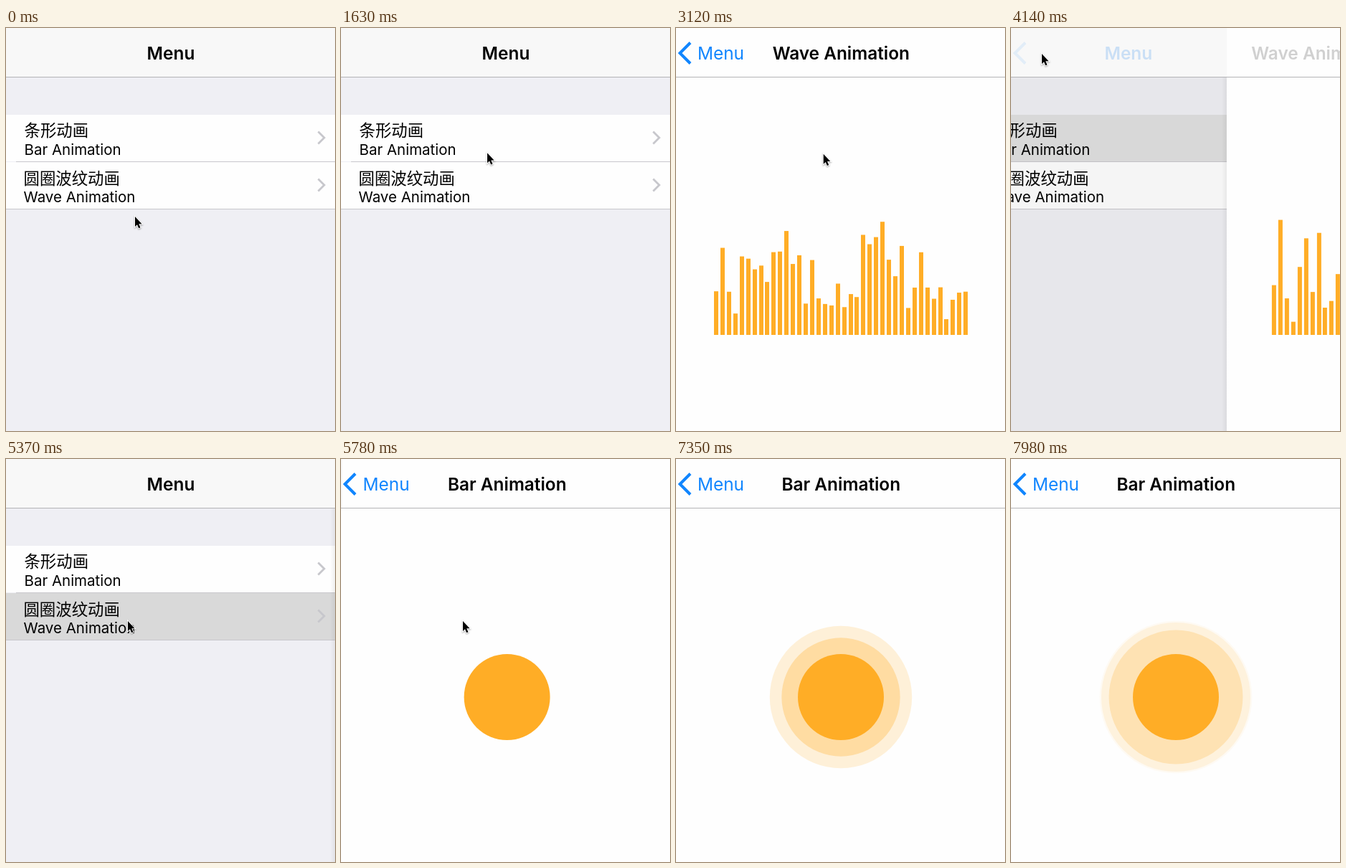
An HTML page with a canvas for the animation above (8 s loop, 459 px wide and 562 px high).

```html
<!DOCTYPE html>
<html lang="zh-CN">
<head>
<meta charset="utf-8">
<title>Menu</title>
<style>
html, body { margin: 0; width: 100%; height: 100%; overflow: hidden; background: #fdfdfd; }
canvas { display: block; }
</style>
</head>
<body>
<canvas id="stage" width="459" height="562"></canvas>
<script>
const W = 459, H = 562, LOOP = 8000;
const ctx = document.getElementById('stage').getContext('2d');
const BLUE = '#1085fe', ORANGE = '#ffad26', PAPER = '#fefefe';
const LATIN = 'Inter, Roboto, sans-serif';
const CJK = '"Noto Sans CJK SC", "Noto Sans CJK", sans-serif';
const PUSH1 = 1980, POP = 4023, PUSH2 = 5370;

const clamp = v => Math.max(0, Math.min(1, v));
const mix = (a, b, k) => a + (b - a) * k;

// Seeded random number in 0..1.
function noise(a, b) {
  const s = Math.sin(a * 127.1 + b * 311.7) * 43758.5453;
  return s - Math.floor(s);
}

function rect(x, y, w, h, color) {
  ctx.fillStyle = color;
  ctx.fillRect(x, y, w, h);
}

function text(s, x, y, font, color, alpha = 1, align = 'left') {
  ctx.globalAlpha = alpha;
  ctx.font = font;
  ctx.textAlign = align;
  ctx.fillStyle = color;
  ctx.fillText(s, x, y);
  ctx.globalAlpha = 1;
}

// Angle bracket with its tip at x, y; a negative size points left.
function chevron(x, y, w, h, width, color, alpha = 1) {
  ctx.globalAlpha = alpha;
  ctx.lineWidth = width;
  ctx.strokeStyle = color;
  ctx.beginPath();
  ctx.moveTo(x - w, y - h);
  ctx.lineTo(x, y);
  ctx.lineTo(x - w, y + h);
  ctx.stroke();
  ctx.globalAlpha = 1;
}

function disc(r, alpha) {
  ctx.globalAlpha = alpha;
  ctx.fillStyle = ORANGE;
  ctx.beginPath();
  ctx.arc(230, 332, r, 0, 7);
  ctx.fill();
  ctx.globalAlpha = 1;
}

// Critically damped slide: 1 before the start, settling at 0.
function slide(t, start) {
  const k = Math.max(0, t - start) * 0.019;
  const v = (1 + k) * Math.exp(-k);
  return v < 0.0015 ? 0 : v;
}

function drawMenu(off, sel) {
  ctx.save();
  ctx.translate(-0.318 * W * (1 - off), 0);
  rect(0, 68, W * 1.4, H, '#efeff4');
  [['条形动画', 'Bar Animation'], ['圆圈波纹动画', 'Wave Animation']].forEach(([zh, en], i) => {
    const y = 121 + 66 * i, x = 25.5 - i;
    rect(0, y, W * 1.4, 65, PAPER);
    ctx.globalAlpha = sel[i];
    rect(0, y, W * 1.4, 65, '#d9d9d9');
    ctx.globalAlpha = 1;
    rect(i ? 0 : 14, y + 65, W * 1.4, 1, '#c8c7cc');
    text(zh, x, y + 30 + i, '22.4px ' + CJK, '#000');
    text(en, x, y + 56, '20.5px ' + LATIN, '#000');
    chevron(444, y + 32, 8.5, 8.5, 2.8, '#c7c7cc');
  });
  ctx.restore();
  rect(0, 68, W, H, `rgba(0,0,0,${0.1 * (1 - off)})`);
}

// Every beat each bar heads for a new random height.
function drawBars(t, moving) {
  const beat = t / 204.6, n = Math.floor(beat), x0 = moving ? 63 : 53;
  const height = (i, n) => 12 + 163 * noise(i + 1, n) ** 1.5;
  for (let i = 0; i < 40; i++) {
    const h = mix(height(i, n), height(i, n + 1), beat - n);
    rect(Math.round(x0 + i * 8.93), 428 - h, 6, h, ORANGE);
  }
}

const RIPPLES = [6350, 6732, 7010, 7190, 7475, 7550, 7715];

function drawRipples(t) {
  for (const start of RIPPLES) {
    const u = (t - start) / 575;
    if (u > 0 && u < 1) disc(60 + 47 * (1 - (1 - u) ** 2), 0.42 * (1 - u));
  }
  disc(60 + 2 * clamp(1 - Math.abs(t - 6760) / 120), 1);
}

function drawPage(t, off) {
  const x = off * W;
  const shade = ctx.createLinearGradient(x - 7, 0, x, 0);
  shade.addColorStop(0, 'rgba(0,0,0,0)');
  shade.addColorStop(1, 'rgba(0,0,0,0.06)');
  if (off > 0.004) rect(x - 7, 69, 7, H, shade);
  ctx.save();
  ctx.translate(x, 0);
  rect(0, 68, W, H, PAPER);
  if (t < PUSH2) drawBars(t, off > 0.004);
  else drawRipples(t);
  ctx.restore();
}

function drawNav(t, off) {
  const bold = '600 24.4px ' + LATIN, popping = t >= POP && t < PUSH2;
  rect(0, 0, W, 68, '#f8f8f8');
  rect(off * W, 0, W, 68, PAPER);
  rect(0, 68, W, 1, '#b4b4b7');

  const menuX = mix(62.5, 230, off ** (popping ? 1.19 : 1)), shown = clamp(1 - off * 1.25);
  text('Menu', menuX, 44, off > 0.5 ? bold : '24.4px ' + LATIN, BLUE, shown, 'center');
  text('Menu', menuX, 44, bold, '#000', clamp((off - 0.65) / 0.35), 'center');

  const fadeIn = clamp((t - (t < POP ? PUSH1 : PUSH2) - 200) / 200);
  chevron(5.5, 35, -14.5, 14.5, 4, BLUE, popping ? shown ** 1.4 : off < 1 ? fadeIn : 0);

  const title = t < PUSH2 ? 'Wave Animation' : 'Bar Animation';
  text(title, 230.3 + off * W * (popping ? 0.667 : 0.9), 44, bold, '#000', shown, 'center');
}

// Pointer key points: time, x, y.
const PATH = [
  [0, 180, 263], [1230, 180, 266], [1680, 207, 163], [2400, 207, 163], [3120, 206, 176],
  [3720, 43, 36], [4260, 43, 36], [4550, 27, 84], [4950, 170, 226], [5800, 170, 226],
  [6370, 172, 236], [6760, 280, 313], [7230, 421, 540]
];

function drawPointer(t) {
  const i = PATH.findIndex(p => p[0] > t);
  if (i < 1) return;
  const [t0, x0, y0] = PATH[i - 1], [t1, x1, y1] = PATH[i];
  const k = (t - t0) / (t1 - t0);
  const arrow = new Path2D('M0 0V14L3 11.2L5.2 16.2L7.5 15.2L5.3 10.3H9.6Z');
  ctx.save();
  ctx.translate(mix(x0, x1, k), mix(y0, y1, k));
  ctx.lineWidth = 2;
  ctx.strokeStyle = '#fff';
  ctx.shadowColor = 'rgba(0,0,0,0.35)';
  ctx.shadowBlur = 2;
  ctx.shadowOffsetY = 1;
  ctx.stroke(arrow);
  ctx.shadowColor = 'transparent';
  ctx.fillStyle = '#000';
  ctx.fill(arrow);
  ctx.restore();
}

function draw(t) {
  const off = t < POP ? slide(t, PUSH1) : t < PUSH2 ? 1 - slide(t, POP) : slide(t, PUSH2);
  const first = t < PUSH1 ? 0 : t < POP ? 1 : t < PUSH2 ? 1 - off ** 4 : 0;
  if (off > 0.004) drawMenu(off, [first, t > PUSH2 ? 1 : 0]);
  else rect(0, 0, W, H, PAPER);
  if (off < 1) drawPage(t, off);
  drawNav(t, off);
  drawPointer(t);
}

const begin = performance.now();
function tick() {
  draw((performance.now() - begin) % LOOP);
  requestAnimationFrame(tick);
}
tick();
</script>
</body>
</html>
```
